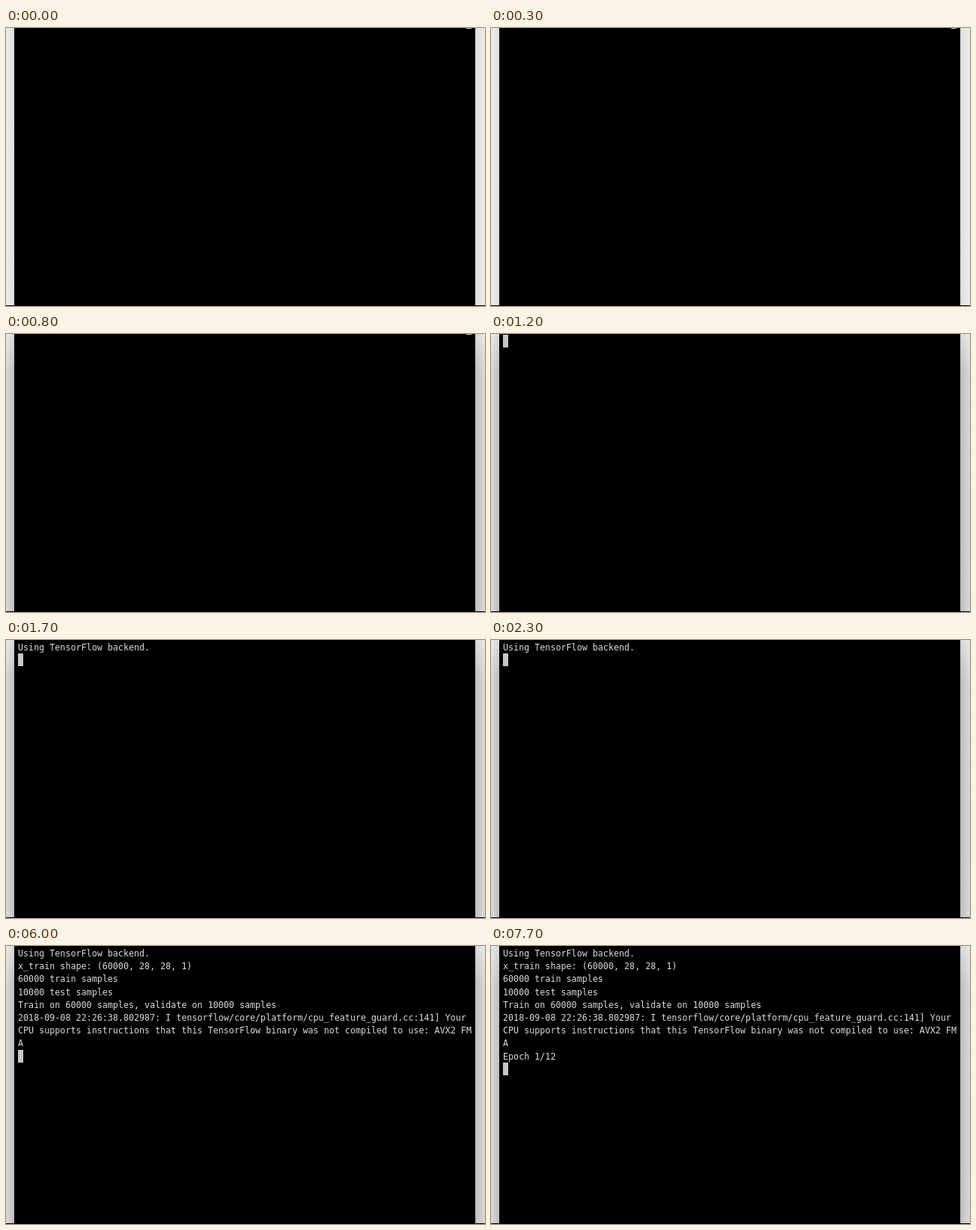
An HTML page with a canvas that plays this animation: 640 by 372 pixels, repeating every 8 s.

```html
<!DOCTYPE html>
<html>
<head>
<meta charset="utf-8">
<style>
  html, body { margin: 0; overflow: hidden; background: #000; }
  canvas { display: block; }
</style>
</head>
<body>
<canvas id="stage" width="640" height="372"></canvas>
<script>
const ctx = document.getElementById('stage').getContext('2d');
const LOOP = 8000, LEFT = 16, ROW = 17.2, CELL = 7.05;
const FONT_SIZE = CELL / 0.602;

// Each line with the time it is printed
const output = [
  [1700, 'Using TensorFlow backend.'],
  [5400, 'x_train shape: (60000, 28, 28, 1)'],
  [5400, '60000 train samples'],
  [5400, '10000 test samples'],
  [6000, 'Train on 60000 samples, validate on 10000 samples'],
  [6000, '2018-09-08 22:26:38.802987: I tensorflow/core/platform/cpu_feature_guard.cc:141] Your'],
  [6000, 'CPU supports instructions that this TensorFlow binary was not compiled to use: AVX2 FM'],
  [6000, 'A'],
  [7700, 'Epoch 1/12']
];

const gray = v => `rgb(${v},${v},${v})`;

function fillGradient(x0, y0, x1, y1, from, to, box) {
  const g = ctx.createLinearGradient(x0, y0, x1, y1);
  g.addColorStop(0, from);
  g.addColorStop(1, to);
  ctx.fillStyle = g;
  ctx.fillRect(...box);
}

// Window shadow on both sides; it deepens when the window gains focus
function drawShadow(t) {
  const depth = t < 600 ? 0 : t < 700 ? 0.8 : t < 800 ? 0.9 : 1;
  const outer = gray(Math.round(236 - 18 * depth));
  const inner = gray(Math.round(222 - 32 * depth));
  fillGradient(0, 0, 11, 0, outer, inner, [0, 0, 11, 371]);
  fillGradient(640, 0, 627, 0, outer, inner, [627, 0, 13, 371]);
  const glow = `rgba(255,255,255,${0.4 * depth})`;
  for (const [x, w] of [[0, 11], [627, 13]])
    fillGradient(0, 0, 0, 50, glow, 'rgba(255,255,255,0)', [x, 0, w, 50]);
}

function draw(t) {
  ctx.fillStyle = '#000';
  ctx.fillRect(0, 0, 640, 372);
  drawShadow(t);

  if (t < 1200) {
    ctx.fillStyle = '#c7c7c7';
    ctx.fillRect(615, 0, 7, 1);
    return;
  }

  const lines = output.filter(([time]) => t >= time);
  ctx.font = `${FONT_SIZE}px "DejaVu Sans Mono", monospace`;
  ctx.fillStyle = '#dcdcdc';
  lines.forEach(([, text], i) => ctx.fillText(text, LEFT, 14 + i * ROW));

  ctx.fillStyle = '#c7c7c7';
  ctx.fillRect(LEFT, Math.round(1.2 + lines.length * ROW), 7, 17);
}

function tick() {
  draw(performance.now() % LOOP);
  requestAnimationFrame(tick);
}
tick();
</script>
</body>
</html>
```
